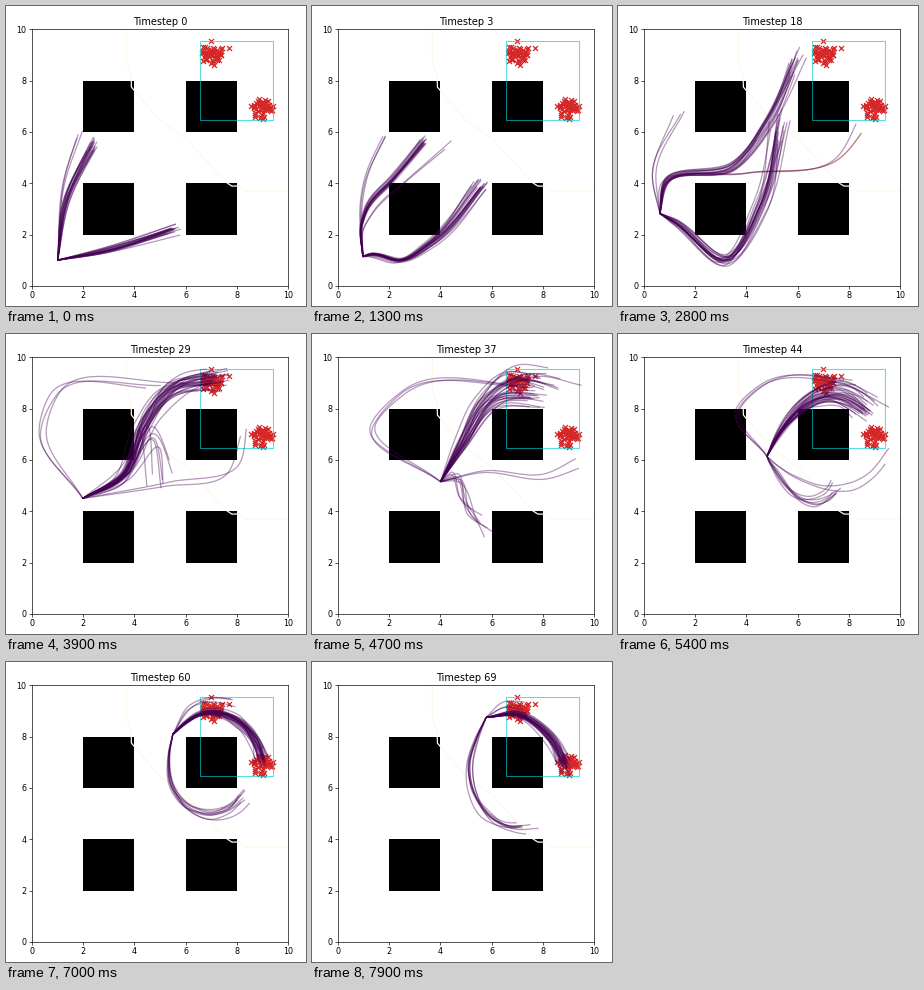
Recreate the animation shown at these times as a matplotlib script. Size 300x300 px, loop 8 s.

```python
import numpy as np
import matplotlib.pyplot as plt
from matplotlib.animation import FuncAnimation
from matplotlib.collections import LineCollection
from matplotlib.patches import Rectangle

HOLD, FRAMES, STEP_MS = 10, 80, 100
SAMPLES = 70

# Steps at which the set of plans takes a distinct shape
KEYS = np.array([0, 10, 18, 29, 37, 52, 69])
STARTS = np.array([(1, 1), (.87, 1.58), (.62, 2.82), (1.98, 4.5),
                   (4, 5.15), (5.15, 7.35), (5.78, 8.75)])
SPREAD = [.11, .19, .2, .28, .28, .22, .12]


def ring(a, b, n=6):
    """Points on the ellipse around the upper right block, angles in degrees."""
    t = np.radians(np.linspace(a, b, n))
    return list(zip(7.08 + 1.95 * np.cos(t), 6.75 + 2.3 * np.sin(t)))


# Waypoints of each route, one entry per key step
UPPER = [
    [(1.3, 3.2), (2.5, 5.75)],
    [(.4, 3.1), (.8, 3.85), (3.3, 4.6), (5.9, 6.25)],
    [(.85, 4), (3.5, 4.65), (4.85, 6.3), (6.1, 9.1)],
    [(3.4, 5.2), (4.3, 7.2), (5.3, 8.6), (7.2, 9.05)],
    [(4.9, 6.6), (6.3, 8.4), (8, 8.5)],
    ring(145, 5),
    [(7, 8.87), (8.3, 7.95), (8.95, 6.7)],
]
LOWER = [
    [(3, 1.37), (5.8, 2.25)],
    [(1.25, 1.72), (3.3, .6), (4.7, 2.2), (5.85, 8.8)],
    [(1.2, 2.5), (3.2, 1), (4.6, 3.2), (5.35, 6.7)],
    [(3.6, 5.4), (4.6, 7.7), (5.7, 8.9), (7.6, 9.3)],
    [(4.8, 6.6), (5.7, 8.3), (7, 9.2), (8.7, 9)],
    UPPER[5],
    UPPER[6],
]
DOWN = LOWER[:3] + [
    [(3.6, 5.5), (4.6, 7), (5.1, 4.9)],
    [(4.6, 5.4), (5.1, 4.2), (5.7, 3.6)],
    ring(185, 363),
    ring(150, 285),
]
LOOP = [
    [(1.2, 4), (1.85, 6.1)],
    [(.38, 3.3), (.6, 4.4), (1.85, 6.15)],
    [(.5, 4.4), (1.6, 7)],
    [(.35, 7), (1, 8.6), (5.5, 8.8)],
    [(1.2, 7.3), (2.2, 8.6), (8, 8.8)],
    [(5.9, 9), (7, 9.5), (8.4, 9.3)],
    [(6.5, 9.25), (7.4, 9.3)],
]
RIGHT = UPPER[:1] + [
    [(.75, 3.2), (1.6, 3.85), (5, 4.5), (9.3, 5.7)],
    [(.75, 3.9), (4, 4.45), (7.6, 5.1), (8.95, 6.85)],
    [(5.2, 4.85), (7.8, 5.4), (8.2, 7)],
    [(5.7, 5.5), (8.3, 5.4), (9.6, 5.9)],
] + DOWN[5:]

# Route, number of paths, how much looser than the usual spread
ROUTES = [(RIGHT, 2, .8), (UPPER, 17, 1), (LOWER, 15, 1.1),
          (DOWN, 7, 1.3), (LOOP, 3, 1.2)]


def hermite(ts, ps, t):
    """Smooth curve through points ps at parameters ts."""
    slope = np.gradient(ps, ts, axis=0)
    i = np.clip(np.searchsorted(ts, t, side="right") - 1, 0, len(ts) - 2)
    h = (ts[i + 1] - ts[i])[:, None]
    u = (t - ts[i])[:, None] / h
    return ((1 + 2 * u) * (1 - u) ** 2 * ps[i] + u * (1 - u) ** 2 * h * slope[i]
            + u * u * (3 - 2 * u) * ps[i + 1] + u * u * (u - 1) * h * slope[i + 1])


def curve(ps, end):
    ts = np.r_[0, np.cumsum(np.hypot(*np.diff(ps, axis=0).T))]
    return hermite(ts, ps, np.linspace(0, ts[-1] * end, SAMPLES))


def make_plan(k, rng):
    """All paths at key step k, relative to their common start."""
    paths = []
    for route, count, loose in ROUTES:
        base = np.array([STARTS[k], *route[k]])
        ramp = np.linspace(0, 1, len(base))[:, None] ** .8 * SPREAD[k] * loose
        for _ in range(count):
            shift = .8 * rng.normal(size=2) + .45 * rng.normal(size=base.shape)
            paths.append(curve(base + ramp * shift, rng.uniform(.9, 1)) - STARTS[k])
    return np.array(paths)


rng = np.random.default_rng(8)
plans = [make_plan(k, rng) for k in range(len(KEYS))]
track = hermite(KEYS, STARTS, np.arange(FRAMES - HOLD))

LOW, HIGH = (6.56, 6.47), (9.4, 9.53)
centers = np.repeat([(7, 9), (8.97, 6.98)], 50, axis=0)
goals = np.clip(centers + rng.normal(0, .21, centers.shape), LOW, HIGH)

fig = plt.figure(figsize=(5, 5), dpi=60)
ax = fig.add_axes([26 / 300, 20.2 / 300, 256.2 / 300, 256.4 / 300])
ax.set(xlim=(0, 10), ylim=(0, 10), xticks=range(0, 11, 2), yticks=range(0, 11, 2))
ax.tick_params(labelsize=9.6)
ax.tick_params(axis="x", pad=2.8)
title = ax.set_title("Timestep 0", fontsize=11.7, pad=5)

for x in (2, 6):
    for y in (2, 6):
        ax.add_patch(Rectangle((x, y), 2, 2, color="black", lw=0))

border = [(3.68, 10), (3.68, 8.75), (3.87, 8.2), (3.88, 7.75), (5, 6.45),
          (6, 5.75), (7.6, 4.02), (7.8, 3.89), (8.1, 3.89), (8.35, 3.7), (10, 3.7)]
ax.plot(*zip(*border), color="#fff7ea", lw=1.5, zorder=1.5)
ax.scatter(*goals.T, marker="x", color="tab:red", zorder=1.6)
ax.add_patch(Rectangle(LOW, *np.subtract(HIGH, LOW), fill=False, lw=1.3,
                       ec="darkturquoise", alpha=.65, zorder=1.7))

glow, = ax.plot([], [], color="#ffc66b", lw=1.5, zorder=1.9)
bundle = LineCollection([], colors="#440154", linewidths=1.5, alpha=.4, zorder=2)
ax.add_collection(bundle)


def draw(frame):
    step = max(0, frame - HOLD)
    k = min(np.searchsorted(KEYS, step, side="right") - 1, len(KEYS) - 2)
    u = (step - KEYS[k]) / (KEYS[k + 1] - KEYS[k])
    paths = track[step] + (1 - u) * plans[k] + u * plans[k + 1]
    bundle.set_segments(paths)

    # The first path to the far goal is tinted for a while
    glow.set_data(*paths[0].T)
    glow.set_alpha(np.interp(step, [3, 10, 18, 24], [0, .7, .7, 0]))
    title.set_text(f"Timestep {step}")
    return bundle, glow, title


anim = FuncAnimation(fig, draw, frames=FRAMES, interval=STEP_MS,
                     repeat=True, repeat_delay=0, blit=False)
plt.show()
```
